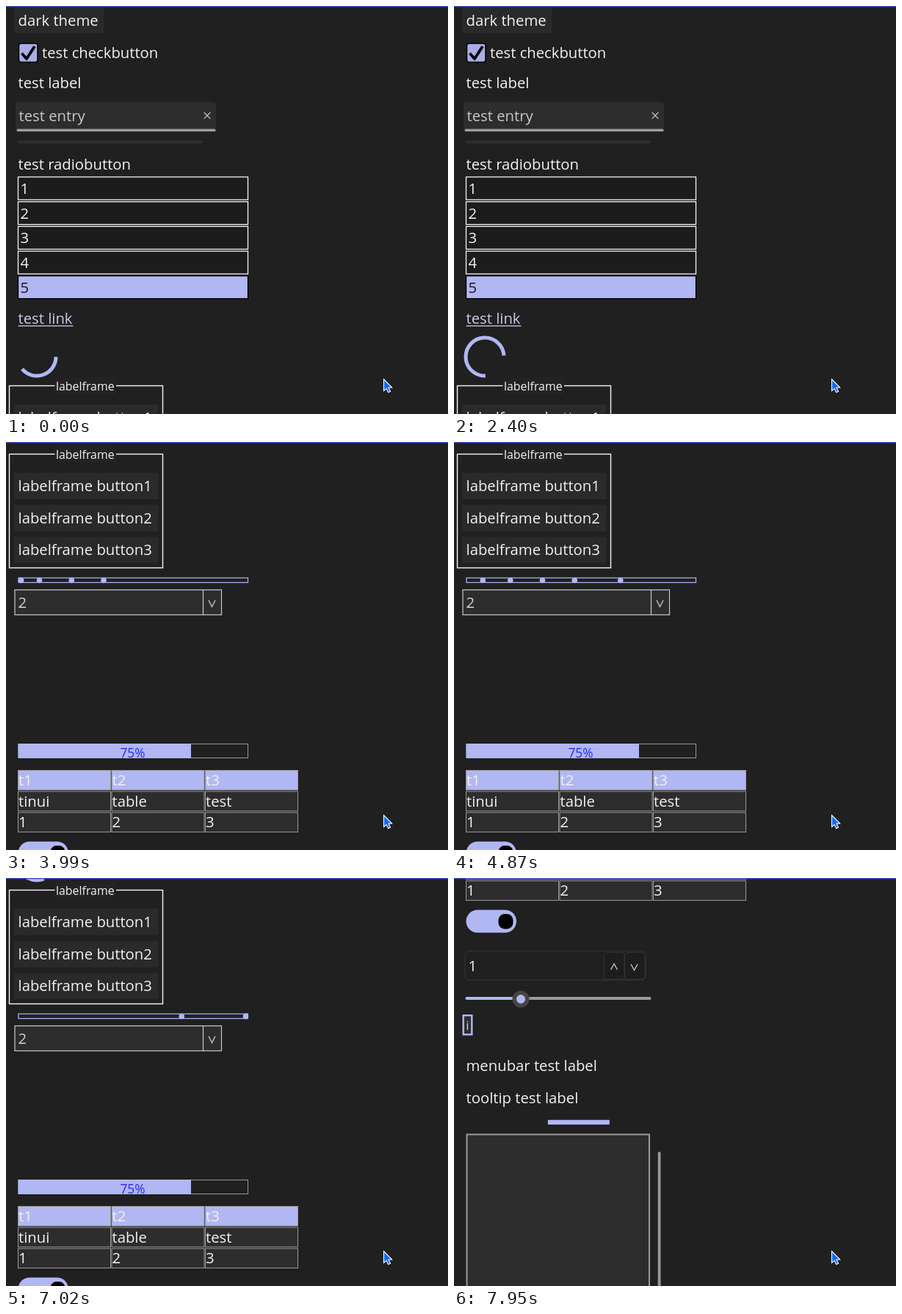
An HTML page that plays this animation: 602x556 px, repeating every 8 s.

```html
<!DOCTYPE html>
<html lang="en">
<head>
<meta charset="utf-8">
<title>Dark theme widgets</title>
<style>
  html, body { margin: 0; width: 100%; height: 100%; overflow: hidden; background: #202020; }
  svg { display: block; width: 100%; height: 100%; }
  text { font-family: "Open Sans", "Noto Sans", sans-serif; font-size: 20.3px; fill: #f2f2f2; white-space: pre; }
</style>
</head>
<body>
<svg id="stage" viewBox="0 0 602 556"></svg>
<script>
const LOOP = 8000, PAGE = 501;
const ACCENT = '#b1b7f3', PANEL = '#2d2d2d', BUTTON = '#2a2a2a', GREY = '#999', WHITE = '#f4f4f4';
const stage = document.getElementById('stage');

function add(parent, tag, attrs, content) {
  const el = document.createElementNS('http://www.w3.org/2000/svg', tag);
  for (const key in attrs) el.setAttribute(key, attrs[key]);
  if (content) el.textContent = content;
  parent.appendChild(el);
  return el;
}
const page = add(stage, 'g', {});
const sections = [0, 1, 2].map(i => add(page, 'g', { transform: `translate(0 ${i * PAGE})` }));
let section = sections[0];

// Boxes are given by their left, top, right and bottom edges.
const box = (l, t, r, b, attrs) =>
  add(section, 'rect', { x: l, y: t, width: r - l, height: b - t, ...attrs });
const label = (x, y, content, attrs) => add(section, 'text', { x, y, ...attrs }, content);
const path = (d, attrs) => add(section, 'path', { d, fill: 'none', ...attrs });
const dot = (cx, cy, r, fill) => add(section, 'circle', { cx, cy, r, fill });
const chevron = (x, y, h) =>
  path(`M${x - 4.5} ${y - h}L${x} ${y + h}L${x + 4.5} ${y - h}`, { stroke: '#c4c4c4', 'stroke-width': 1.4 });

// Section 1: basic widgets
box(11, 2, 133, 37, { fill: BUTTON });
label(16.5, 27, 'dark theme');
box(17.5, 51, 43, 76.5, { rx: 3, fill: '#a9ade4', stroke: '#000', 'stroke-width': 1.5 });
path('M21.5 64.5L28 72L39 55', { stroke: '#000', 'stroke-width': 3.8, 'stroke-linejoin': 'round' });
label(49, 70.5, 'test checkbutton');
label(16.5, 112, 'test label');
box(13, 131, 286, 170, { rx: 5, fill: PANEL });
box(14.5, 167.5, 285.5, 171, { rx: 1.7, fill: '#9c9c9c' });
label(17.5, 157, 'test entry', { style: 'fill:#c8c8c8' });
path('M269.7 145l8.6 8.6m0-8.6l-8.6 8.6', { stroke: '#c4c4c4', 'stroke-width': 1.3 });
box(15.5, 183.2, 268.5, 187.2, { rx: 2, fill: '#2e2e2e' });
label(16.5, 223, 'test radiobutton');
for (let i = 0; i < 5; i++) {
  const top = 233 + i * 33.7, chosen = i === 4;
  box(16.5, top, 329.5, top + 31, {
    fill: chosen ? ACCENT : '#1c1c1c', stroke: chosen ? '#000' : WHITE, 'stroke-width': 1.3
  });
  label(19.5, top + 23, String(i + 1), { style: chosen ? 'fill:#1c1c1c' : '' });
}
label(16.5, 433, 'test link', { style: 'fill:#c9cae6' });
box(16.5, 435.3, 91.5, 436.6, { fill: '#c9cae6' });
const ring = path('', { stroke: ACCENT, 'stroke-width': 5 });

// Section 2: label frame, wait bar, combobox, progress, table
section = sections[1];
box(4.5, 16.5, 213.5, 171.5, { fill: 'none', stroke: WHITE, 'stroke-width': 1.4 });
box(66.5, 5, 150, 28, { fill: '#232323' });
label(68, 23, 'labelframe', { style: 'font-size:15.9px' });
for (let i = 0; i < 3; i++) {
  const top = 42 + i * 43.6;
  box(11, top, 207, top + 36, { fill: BUTTON });
  label(16.5, top + 25, `labelframe button${i + 1}`);
}
box(17, 185.2, 329.5, 191.5, { fill: 'none', stroke: ACCENT, 'stroke-width': 1.2 });
add(add(stage, 'clipPath', { id: 'track' }), 'rect', { x: 16.5, y: 180, width: 313.5, height: 16 });
const dotGroup = add(section, 'g', { 'clip-path': 'url(#track)' });
const dots = Array.from({ length: 5 }, () =>
  add(dotGroup, 'circle', { cy: 188.5, r: 3.8, fill: ACCENT }));
box(12, 201.5, 293.5, 235.5, { fill: PANEL, stroke: '#c8c8c8', 'stroke-width': 1.2 });
path('M268.5 201.5V235.5', { stroke: '#c8c8c8', 'stroke-width': 1.2 });
label(16.5, 226, '2', { style: 'fill:#d0d0d0' });
chevron(280.5, 220, 4.5);
box(17, 411.5, 329.5, 430.5, { fill: 'none', stroke: GREY });
box(16.5, 411, 252, 431, { fill: ACCENT });
label(172.5, 429.5, '75%', { 'text-anchor': 'middle', style: 'font-size:17.4px;fill:#2828f0' });
[['t1', 't2', 't3'], ['tinui', 'table', 'test'], ['1', '2', '3']].forEach((cells, row) =>
  cells.forEach((cell, col) => {
    const left = 16.5 + col * 127.5, top = 447.5 + row * 28.7;
    box(left, top, left + 126, top + 26.6, { fill: row ? PANEL : ACCENT, stroke: GREY });
    label(left + 0.5, top + 20.5, cell);
  }));

// Section 3: switch, spinbox, slider, labels, text box
section = sections[2];
box(16.5, 43.5, 85, 74.5, { rx: 15.5, fill: ACCENT });
box(60.5, 49, 80.5, 69.5, { rx: 8.5, fill: '#000' });
box(15, 99.5, 261, 139, { rx: 6, fill: 'none', stroke: '#303030', 'stroke-width': 1.3 });
label(19.5, 127, '1');
for (const left of [204.5, 232.5]) {
  box(left, 101.5, left + 27.5, 138, { rx: 4, fill: '#1d1d1d', stroke: '#343434' });
}
chevron(218, 121, -4);
chevron(245.5, 121.5, 4);
box(15.5, 162, 92, 166, { rx: 2, fill: ACCENT });
box(92, 162, 268.5, 166, { rx: 2, fill: GREY });
dot(91, 165, 11.5, '#454545');
dot(91, 165, 6, ACCENT);
box(12.7, 187.2, 24.3, 213.3, { fill: PANEL, stroke: ACCENT, 'stroke-width': 2.4 });
label(18.5, 206.5, 'i', { 'text-anchor': 'middle', style: 'font-size:17px;fill:#d0d0d0' });
label(16.5, 263, 'menubar test label');
label(16.5, 307, 'tooltip test label');
const slider = box(0, 329.7, 84, 336, { fill: ACCENT });
box(17.5, 349.5, 266, 620, { fill: PANEL, stroke: GREY, 'stroke-width': 2 });
box(277.7, 373, 281.5, 620, { rx: 1.9, fill: GREY });

// Fixed overlay: window edge and pointer
add(stage, 'rect', { width: 602, height: 1.3, fill: '#4350c4' });
add(stage, 'path', {
  d: 'M514.5 508.5V524.5L518 521.3L520.6 526.6L523.6 525.2L521 520H525.7Z',
  fill: '#1268f5', stroke: '#fff', 'stroke-width': 1.1
});

// Ring: the leading end turns steadily while the sweep breathes.
const SWEEP = [[0, 140], [1380, 284], [1750, 310], [3490, 198], [4600, 50],
  [4870, 75], [6040, 300], [6500, 325], [7020, 290], [8000, 220]];

function interpolate(table, t) {
  const i = Math.max(1, table.findIndex(([time]) => time >= t));
  const [t0, v0] = table[i - 1], [t1, v1] = table[i];
  return v0 + (v1 - v0) * (t - t0) / (t1 - t0);
}
function ringPath(t) {
  const head = 140 + 0.39 * t, sweep = interpolate(SWEEP, t);
  const point = deg => {
    const a = deg * Math.PI / 180;
    return `${42 + 26 * Math.cos(a)} ${478 + 26 * Math.sin(a)}`;
  };
  return `M${point(head - sweep)}A26 26 0 ${sweep > 180 ? 1 : 0} 1 ${point(head)}`;
}

// Dots advance one unit per tick, then two units past the middle.
function dotX(t, index) {
  const tick = Math.max(0, Math.floor((t - 2618 - 503 * index) / 75));
  const units = Math.min(49, tick + Math.max(0, tick - 27));
  return 20.5 + 6.25 * units;
}

function draw(t) {
  const scroll = t < 3840 ? 0 : t < 7280 ? PAGE : 2 * PAGE;
  page.setAttribute('transform', `translate(0 ${-scroll})`);
  ring.setAttribute('d', ringPath(t));
  dots.forEach((el, i) => el.setAttribute('cx', dotX(t, i)));
  slider.setAttribute('x', 127.7 + 0.134 * (t - 7950));
}

const begin = performance.now();
function frame() {
  draw((performance.now() - begin) % LOOP);
  requestAnimationFrame(frame);
}
frame();
</script>
</body>
</html>
```
